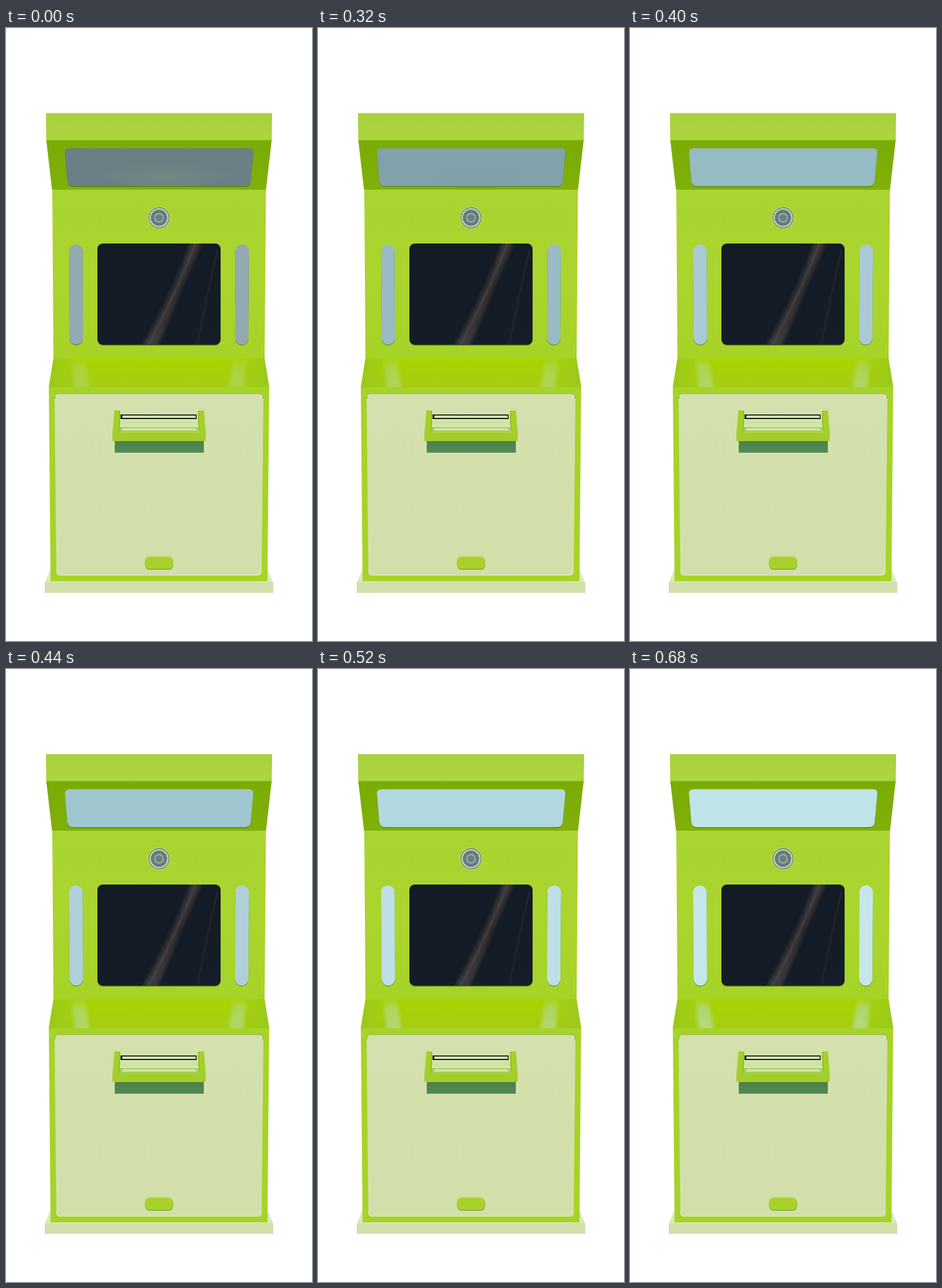
Animation, 529 px wide and 1058 px high, one loop 760 ms. Source, as an HTML page:

```html
<!DOCTYPE html>
<html lang="en">
<head>
<meta charset="utf-8">
<title>Kiosk lights</title>
<style>
  html, body { margin: 0; width: 100%; height: 100%; overflow: hidden; background: #fff; }
  svg { display: block; width: 100vw; height: 100vh; }
</style>
</head>
<body>
<svg viewBox="0 0 529 1058" preserveAspectRatio="none">
  <defs>
    <linearGradient id="head" x2="0" y2="1">
      <stop stop-color="#a9d13f"/><stop offset="1" stop-color="#abd53d"/>
    </linearGradient>
    <linearGradient id="under" x2="0" y2="1">
      <stop stop-color="#7aab04"/><stop offset="1" stop-color="#80b008"/>
    </linearGradient>
    <linearGradient id="back" x2="0" y2="1">
      <stop stop-color="#a9d431"/><stop offset=".5" stop-color="#aad52e"/><stop offset="1" stop-color="#a6d326"/>
    </linearGradient>
    <linearGradient id="shelf" x2="0" y2="1">
      <stop stop-color="#a7d500"/><stop offset="1" stop-color="#a5cd11"/>
    </linearGradient>
    <linearGradient id="side">
      <stop stop-color="#9bc81c"/><stop offset=".14" stop-color="#9bc81c" stop-opacity="0"/>
      <stop offset=".86" stop-color="#9bc81c" stop-opacity="0"/><stop offset="1" stop-color="#9bc81c"/>
    </linearGradient>
    <linearGradient id="panel" x2="0" y2="1">
      <stop stop-color="#d4e0ae"/><stop offset="1" stop-color="#d2dfa9"/>
    </linearGradient>
    <linearGradient id="shade" x2="0" y2="1">
      <stop stop-color="#4a8046"/><stop offset="1" stop-color="#518a58"/>
    </linearGradient>
    <linearGradient id="glass" x2="1" y2="1">
      <stop stop-color="#131c24"/><stop offset=".55" stop-color="#131b26"/><stop offset="1" stop-color="#151e28"/>
    </linearGradient>
    <linearGradient id="streak" x2="0" y2="1">
      <stop stop-color="#4a4343"/><stop offset=".45" stop-color="#3a3637"/><stop offset="1" stop-color="#4b4747"/>
    </linearGradient>
    <linearGradient id="gleam" x2="0" y2="1">
      <stop stop-color="#b2d660" stop-opacity=".3"/><stop offset=".25" stop-color="#b0d66a"/>
      <stop offset="1" stop-color="#b4d984"/>
    </linearGradient>
    <radialGradient id="tint" cy=".75">
      <stop stop-color="#748e80"/><stop offset="1" stop-color="#748e80" stop-opacity="0"/>
    </radialGradient>
    <filter id="soft1" x="-50%" y="-20%" width="200%" height="140%"><feGaussianBlur stdDeviation="1"/></filter>
    <filter id="soft3" x="-50%" y="-20%" width="200%" height="140%"><feGaussianBlur stdDeviation="3"/></filter>
    <clipPath id="screenClip"><rect x="158" y="372" width="213" height="174.500" rx="9"/></clipPath>
    <clipPath id="shelfClip"><path d="M82 570H447L455 620H74Z"/></clipPath>
    <path id="lampShape" d="M110 207.500H420Q428.500 207.500 427.500 216L423 264Q422 273 413 273H116Q107 273 106 264L102 216Q101 207.500 110 207.500Z"/>
    <path id="barShape" d="M109 383A12 12 0 0 1 132.500 383L133 535A11.500 11.500 0 0 1 110 535Z"/>
  </defs>

  <!-- base -->
  <path d="M77 934L67 957H462L452 934Z" fill="#dce9bd"/>
  <path d="M67 956.500H462V975H67Z" fill="#d2dfab"/>

  <!-- body -->
  <path d="M74 619H455L452 955H77Z" fill="#a7d328"/>
  <path d="M80 278H449.500L447 571H82Z" fill="url(#back)"/>
  <path d="M69.500 192H459.500L449.500 279H79.500Z" fill="url(#under)"/>
  <path d="M69 147H460L459.500 193.500H69.500Z" fill="url(#head)"/>
  <path d="M82 570H447L455 620H74Z" fill="url(#shelf)"/>
  <path d="M82 570H447L455 620H74Z" fill="url(#side)"/>
  <g id="gleams" clip-path="url(#shelfClip)">
    <g filter="url(#soft3)">
      <path d="M113 572H136L145 624H119Z" fill="url(#gleam)"/>
      <path d="M393 572H416L410 624H384Z" fill="url(#gleam)"/>
    </g>
  </g>

  <!-- top lamp -->
  <use href="#lampShape" y="1.200" fill="#527d17"/>
  <use href="#lampShape" id="lamp"/>
  <ellipse id="lampTint" cx="275" cy="246" rx="125" ry="27" fill="url(#tint)"/>

  <!-- camera -->
  <circle cx="264.500" cy="327.500" r="20.500" fill="#a9cf52"/>
  <circle cx="264.500" cy="327.500" r="18.700" fill="#c5dd91"/>
  <circle cx="264.500" cy="327.500" r="17.200" fill="#cfe1a3" stroke="#5e7676" stroke-width="1.400"/>
  <circle cx="264.500" cy="327.500" r="14.300" fill="#667a86"/>
  <circle cx="264.500" cy="327.500" r="7.300" fill="#6b7e88" stroke="#b5cc9b" stroke-width="1.400"/>

  <!-- side lamps -->
  <g id="bars">
    <g fill="#55851f"><use href="#barShape" y="1.200"/><use href="#barShape" y="1.200" transform="matrix(-1 0 0 1 529 0)"/></g>
    <use href="#barShape"/><use href="#barShape" transform="matrix(-1 0 0 1 529 0)"/>
  </g>

  <!-- screen -->
  <rect x="158.500" y="373" width="212" height="175" rx="9" fill="#4d7f19"/>
  <g clip-path="url(#screenClip)">
    <rect x="158" y="372" width="213" height="175" fill="url(#glass)"/>
    <path d="M320 368H339Q304 450 261 551H235Q285 462 320 368Z" fill="url(#streak)" opacity=".72" filter="url(#soft3)"/>
    <path d="M328 370Q298 448 246 549" fill="none" stroke="#625650" stroke-width="4" opacity=".38" filter="url(#soft1)"/>
    <path d="M366 382Q350 448 331 546" fill="none" stroke="#3b3b3f" stroke-width="2" opacity=".55" filter="url(#soft1)"/>
  </g>

  <!-- front panel -->
  <path d="M91 630.500H438Q445 630.500 445 637.500L442 938Q442 945 435 945H94Q87 945 87 938L84 637.500Q84 630.500 91 630.500Z" fill="url(#panel)"/>
  <path d="M84.500 640V637Q84.500 631 91 631H438Q444.500 631 444.500 637V640" fill="none" stroke="#82ad1d"/>
  <path d="M87.500 936V938Q87.500 944.500 94 944.500H435Q441.500 944.500 441.500 938V936" fill="none" stroke="#e2ecc4"/>

  <!-- tray -->
  <path d="M188 712H342V733H188Z" fill="url(#shade)"/>
  <path d="M196 667H333V699H193Z" fill="#d2e2a7"/>
  <path d="M198 667H329.500V675H198Z" fill="#0d1808"/>
  <path d="M201 668.700H328V673H201Z" fill="#d5e3b0"/>
  <path d="M197 675H332V677H197Z" fill="#e1ecc1"/>
  <path d="M197 687.500H332L334 698.500H194Z" fill="#9fce5a"/>
  <path d="M202 690.500H328L330 695H200Z" fill="#cfe5a0"/>
  <path d="M197 686H332V688.500H197Z" fill="#dceabb"/>
  <path d="M187.500 660H197V683L194 699H184Z M342 660H332.500V683L335.500 699H345.500Z" fill="#a5d126"/>
  <path d="M196.500 661V683L194.500 697M333 661V683L335 697" fill="none" stroke="#7fae15" stroke-width="1.200"/>
  <path d="M184 697.500H345.500L345 713H184Z" fill="#a3cd29"/>
  <path d="M195 698H334" stroke="#b4da43"/>

  <!-- button -->
  <rect x="240" y="911" width="49" height="23" rx="8" fill="#c1db78"/>
  <rect x="240.500" y="914" width="48.500" height="21" rx="8" fill="#79a334"/>
  <rect x="240.500" y="913" width="48" height="20.700" rx="8" fill="#a8d22b"/>
</svg>
<script>
  const LOOP = 760, START = 280, STEP = 40;
  const lampColors = ["#6b8086", "#6e8890", "#80a2ac", "#8bb0b9", "#95bbc4", "#9fc6cf",
    "#a9cfd7", "#b2d8df", "#b7dde3", "#bbe1e5", "#bde3e6", "#bee4e7"];
  const barColors = ["#94a8b2", "#94a9b3", "#9abac4", "#a1c4ce", "#a9cad4", "#b0d0d9",
    "#b8d8e0", "#bedfe6", "#c2e3e8", "#c4e5e9", "#c5e6ea", "#c6e7ea"];
  const get = id => document.getElementById(id);
  const lamp = get("lamp"), tint = get("lampTint"), bars = get("bars"), gleams = get("gleams");
  let shown = -1;

  function draw(t) {
    const i = t < START ? 0 : Math.min(11, Math.floor((t - START) / STEP) + 1);
    if (i === shown) return;
    shown = i;
    lamp.setAttribute("fill", lampColors[i]);
    bars.setAttribute("fill", barColors[i]);
    tint.setAttribute("opacity", [0.65, 0.3, 0.08][i] || 0);
    const glow = 1 - (1 - i / 11) ** 1.5;
    gleams.setAttribute("opacity", 0.5 + 0.5 * glow);
  }

  const begin = performance.now();
  function tick(now) {
    draw(Math.max(0, now - begin) % LOOP);
    requestAnimationFrame(tick);
  }
  draw(0);
  requestAnimationFrame(tick);
</script>
</body>
</html>
```
